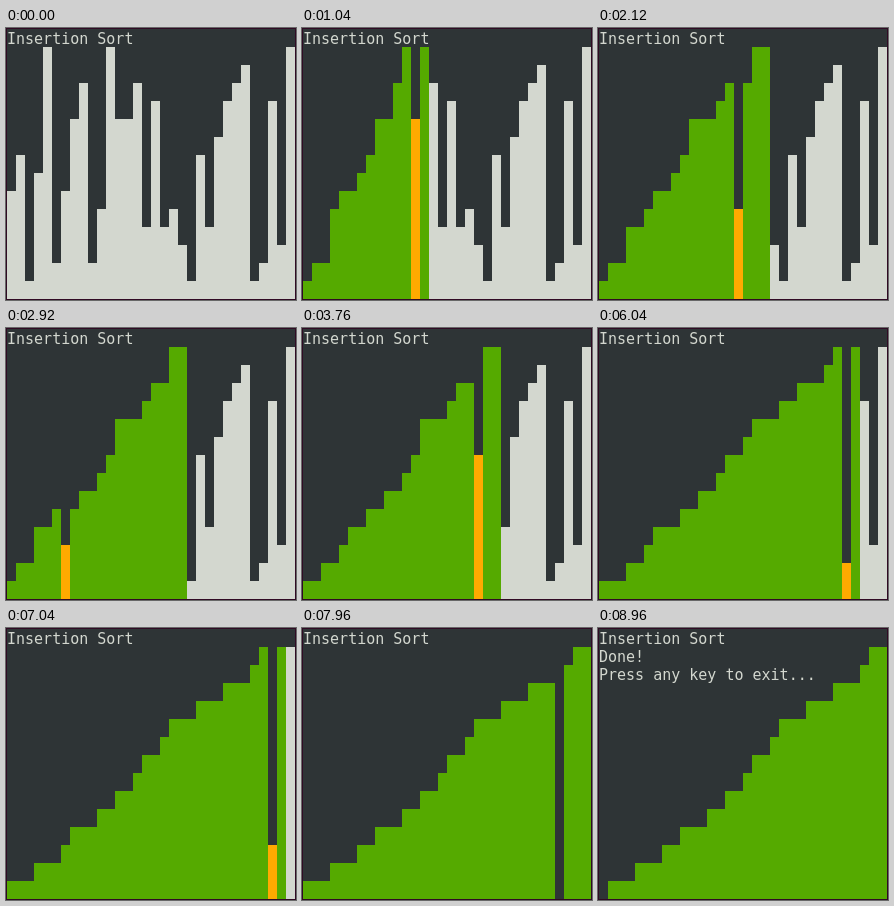
An HTML page with a canvas that plays this animation: 290 px wide and 272 px high, repeating every 9000 ms.

```html
<!DOCTYPE html>
<html lang="en">
<head>
<meta charset="utf-8">
<title>Insertion Sort</title>
<style>
  html, body { margin: 0; width: 290px; height: 272px; overflow: hidden; background: #300a24; }
  canvas { display: block; }
</style>
</head>
<body>
<canvas id="stage" width="290" height="272"></canvas>
<script>
const ctx = document.getElementById('stage').getContext('2d');
const CELL_W = 9, CELL_H = 18, COLS = 32, BOTTOM = 271;
const TICK = 40, LOOP = 9000;
const GRAY = '#d3d7cf', GREEN = '#55aa00', ORANGE = '#ffaa00', BACK = '#2e3436';

// The last value lies one column past the right edge.
const values = [6, 8, 1, 7, 14, 2, 6, 10, 12, 2, 5, 14, 10, 10, 12, 4, 11,
                4, 5, 3, 1, 8, 4, 9, 11, 12, 13, 1, 2, 11, 3, 14, 0];

// One state before every swap, plus the untouched and the finished list.
function sortStates(list) {
  const a = [...list];
  const states = [];
  const save = (sorted, active, done) => states.push({ bars: [...a], sorted, active, done });
  save(-1, -1, false);
  for (let i = 1; i < a.length; i++) {
    for (let j = i; j > 0 && a[j - 1] > a[j]; j--) {
      save(i, j, false);
      [a[j - 1], a[j]] = [a[j], a[j - 1]];
    }
  }
  save(a.length, -1, true);
  return states;
}

const states = sortStates(values);

// Sorting pace: [tick, state]
const pace = [[0, 0], [26, 31], [53, 67], [94, 113], [125, 146], [176, 205], [224, states.length - 1]];

function stateAt(tick) {
  const n = Math.max(1, pace.findIndex(p => p[0] >= tick));
  const [t0, s0] = pace[n - 1], [t1, s1] = pace[n];
  return states[Math.round(s0 + (s1 - s0) * (tick - t0) / (t1 - t0))];
}

function print(text, row) {
  ctx.fillText(text, 1, 16 + row * CELL_H);
}

function draw({ bars, sorted, active, done }) {
  ctx.fillStyle = '#300a24';
  ctx.fillRect(0, 0, 290, 272);
  ctx.fillStyle = BACK;
  ctx.fillRect(1, 1, 288, 270);

  for (let i = 0; i < COLS; i++) {
    const h = bars[i] * CELL_H;
    ctx.fillStyle = i === active ? ORANGE : i <= sorted ? GREEN : GRAY;
    ctx.fillRect(1 + i * CELL_W, BOTTOM - h, CELL_W, h);
  }

  ctx.fillStyle = GRAY;
  ctx.font = '15px "DejaVu Sans Mono", monospace';
  print('Insertion Sort', 0);
  if (done) {
    print('Done!', 1);
    print('Press any key to exit...', 2);
  }
}

const start = performance.now();
function loop() {
  const t = (performance.now() - start) % LOOP;
  draw(stateAt(Math.floor(t / TICK)));
  requestAnimationFrame(loop);
}
loop();
</script>
</body>
</html>
```
